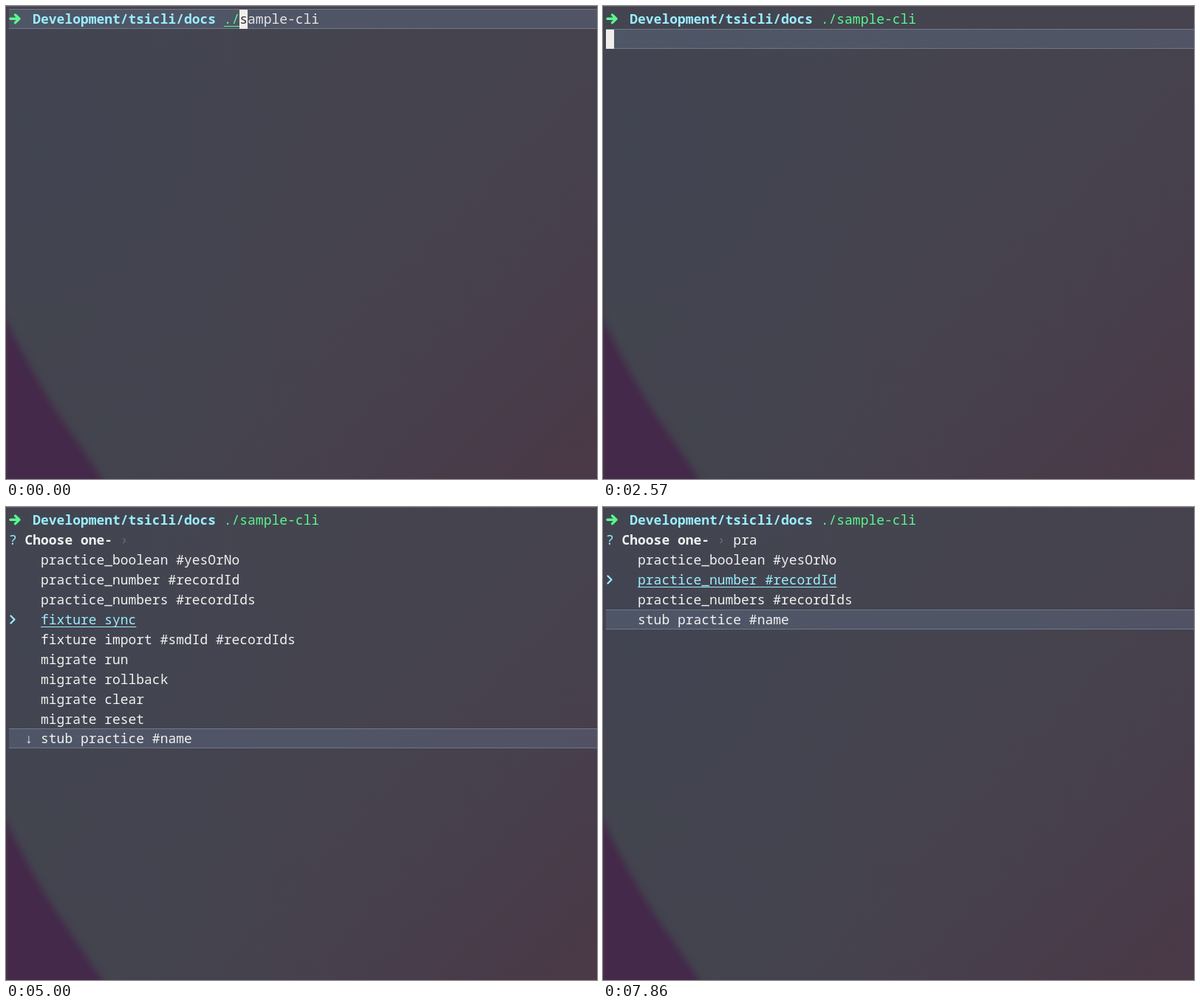
An HTML page with a canvas for the animation above (8000 ms loop, 800 by 641 pixels).

```html
<!DOCTYPE html>
<html lang="en">
<head>
<meta charset="utf-8">
<title>Terminal menu</title>
<style>
  html, body { margin: 0; width: 100%; height: 100%; overflow: hidden; background: #44444e; }
  canvas { display: block; width: 800px; height: 641px; }
</style>
</head>
<body>
<canvas id="stage" width="800" height="641"></canvas>
<script>
const W = 800, H = 641, LOOP = 8000;
const LEFT = 4, CELL = 10.77, ROW = 26.95, BASE = 24;
const FONT = '17.95px "Noto Sans Mono", "DejaVu Sans Mono", monospace';
const WHITE = '#f1f1f0', CYAN = '#9aedfe', GREEN = '#5af78e', BLOCK = '#f0eeea';

const ctx = document.getElementById('stage').getContext('2d');
const COMMAND = './sample-cli';
const CMD_COL = 27;
const ITEMS = [
  'practice_boolean #yesOrNo', 'practice_number #recordId', 'practice_numbers #recordIds',
  'fixture sync', 'fixture import #smdId #recordIds', 'migrate run', 'migrate rollback',
  'migrate clear', 'migrate reset', 'stub practice #name'
];

// Moments (ms) of each key press
const TYPE = [140, 290, 430, 570, 710, 1000, 1140, 1290, 1430, 1570];
const ENTER = 2140, MENU = 3000;
const MOVES = [[4000, 1], [4290, 1], [4430, 1], [4710, 1], [5000, -1], [5140, -1], [5430, -1]];
const FILTER = [6140, 6290, 6430];

const colX = col => LEFT + col * CELL;
const baseline = row => Math.round(BASE + row * ROW);

function text(str, col, row, color, opts = {}) {
  ctx.font = (opts.bold ? '600 ' : '') + FONT;
  ctx.fillStyle = color;
  [...str].forEach((ch, i) => ctx.fillText(ch, colX(col + i), baseline(row)));
  if (opts.underline) ctx.fillRect(colX(col), baseline(row) + 3, str.length * CELL, 1);
}

function band(row) {
  const y = Math.round(4 + row * ROW);
  ctx.fillStyle = 'rgba(102,122,150,0.32)';
  ctx.fillRect(LEFT, y, W - LEFT, 27);
  ctx.fillStyle = 'rgba(160,172,190,0.4)';
  ctx.fillRect(LEFT, y, W - LEFT, 1);
  ctx.fillRect(LEFT, y + 26, W - LEFT, 1);
}

function block(col, row) {
  ctx.fillStyle = BLOCK;
  ctx.fillRect(Math.round(colX(col)), Math.round(5 + row * ROW), 11, 26);
}

function stroke(color, width, points) {
  ctx.strokeStyle = color;
  ctx.lineWidth = width;
  ctx.lineCap = ctx.lineJoin = 'round';
  ctx.beginPath();
  points.forEach(([x, y]) => ctx.lineTo(x, y));
  ctx.stroke();
}

function makeBackdrop() {
  const layer = document.createElement('canvas');
  layer.width = W;
  layer.height = H;
  const g = layer.getContext('2d');
  const fill = (gradient, stops) => {
    stops.forEach(([at, color]) => gradient.addColorStop(at, color));
    g.fillStyle = gradient;
    g.fillRect(0, 0, W, H);
  };
  fill(g.createLinearGradient(100, 0, 760, 641),
    [[0, '#44464f'], [0.5, '#45434e'], [0.75, '#473f4c'], [1, '#4a3947']]);
  fill(g.createRadialGradient(40, 190, 0, 40, 190, 420),
    [[0, 'rgba(64,68,82,0.7)'], [1, 'rgba(64,68,82,0)']]);
  fill(g.createRadialGradient(130, 560, 0, 130, 560, 300),
    [[0, 'rgba(66,68,78,0.9)'], [1, 'rgba(66,68,78,0)']]);

  g.filter = 'blur(5px)';
  g.fillStyle = '#44294a';
  g.beginPath();
  g.moveTo(-30, 385);
  g.lineTo(2, 430);
  g.quadraticCurveTo(42, 510, 72, 555);
  g.quadraticCurveTo(105, 602, 145, 665);
  g.lineTo(-30, 665);
  g.fill();
  g.filter = 'none';

  g.fillStyle = 'rgba(80,58,76,0.3)';
  g.fillRect(0, 0, 3, H);
  g.fillStyle = '#67565f';
  g.fillRect(0, 0, W, 1);
  return layer;
}

function drawPrompt() {
  stroke(GREEN, 3.4, [[6, 17.3], [16, 17.3]]);
  stroke(GREEN, 3.4, [[12.5, 12], [18, 17.3], [12.5, 22.6]]);
  text('Development/tsicli/docs', 3, 0, CYAN, { bold: true });
}

function drawCommand(typed, showCursor) {
  const count = 2 + typed;
  const done = count === COMMAND.length;
  const color = done || typed === 0 ? GREEN : WHITE;
  text(COMMAND.slice(0, count), CMD_COL, 0, color, { underline: !done });
  text(COMMAND.slice(count), CMD_COL + count, 0, '#e6e6e8');
  if (!showCursor) return;
  block(CMD_COL + count, 0);
  if (!done) text(COMMAND[count], CMD_COL + count, 0, '#35353c');
}

function drawMenu(selected, query) {
  const shown = ITEMS.filter(item => fuzzy(query, item));
  const last = shown.length + 1;
  band(last);
  text('?', 0, 1, CYAN);
  text('Choose one-', 2, 1, WHITE, { bold: true });
  text('›', 14, 1, '#6d6d77');
  text(query, 16, 1, WHITE);
  shown.forEach((item, i) => {
    const on = i === selected;
    text(item, 4, i + 2, on ? CYAN : WHITE, { underline: on });
  });
  const y = baseline(selected + 2) - 6.5;
  stroke(CYAN, 2.3, [[6.5, y - 5], [11.5, y], [6.5, y + 5]]);
  if (!query) text('↓', 2, last, WHITE);
}

// True when the letters of the query occur in order
function fuzzy(query, str) {
  let at = -1;
  return [...query].every(ch => (at = str.indexOf(ch, at + 1)) >= 0);
}

const backdrop = makeBackdrop();
const passed = (times, t) => times.filter(at => t >= at).length;

function draw(t) {
  ctx.drawImage(backdrop, 0, 0);
  if (t < MENU) {
    const row = t < ENTER ? 0 : 1;
    band(row);
    if (row) block(0, 1);
  }
  drawPrompt();
  drawCommand(passed(TYPE, t), t < ENTER);
  if (t >= MENU) {
    const selected = MOVES.reduce((sum, [at, step]) => sum + (t >= at ? step : 0), 0);
    drawMenu(selected, 'pra'.slice(0, passed(FILTER, t)));
  }
}

const start = performance.now();
function tick() {
  draw((performance.now() - start) % LOOP);
  requestAnimationFrame(tick);
}
tick();
</script>
</body>
</html>
```
